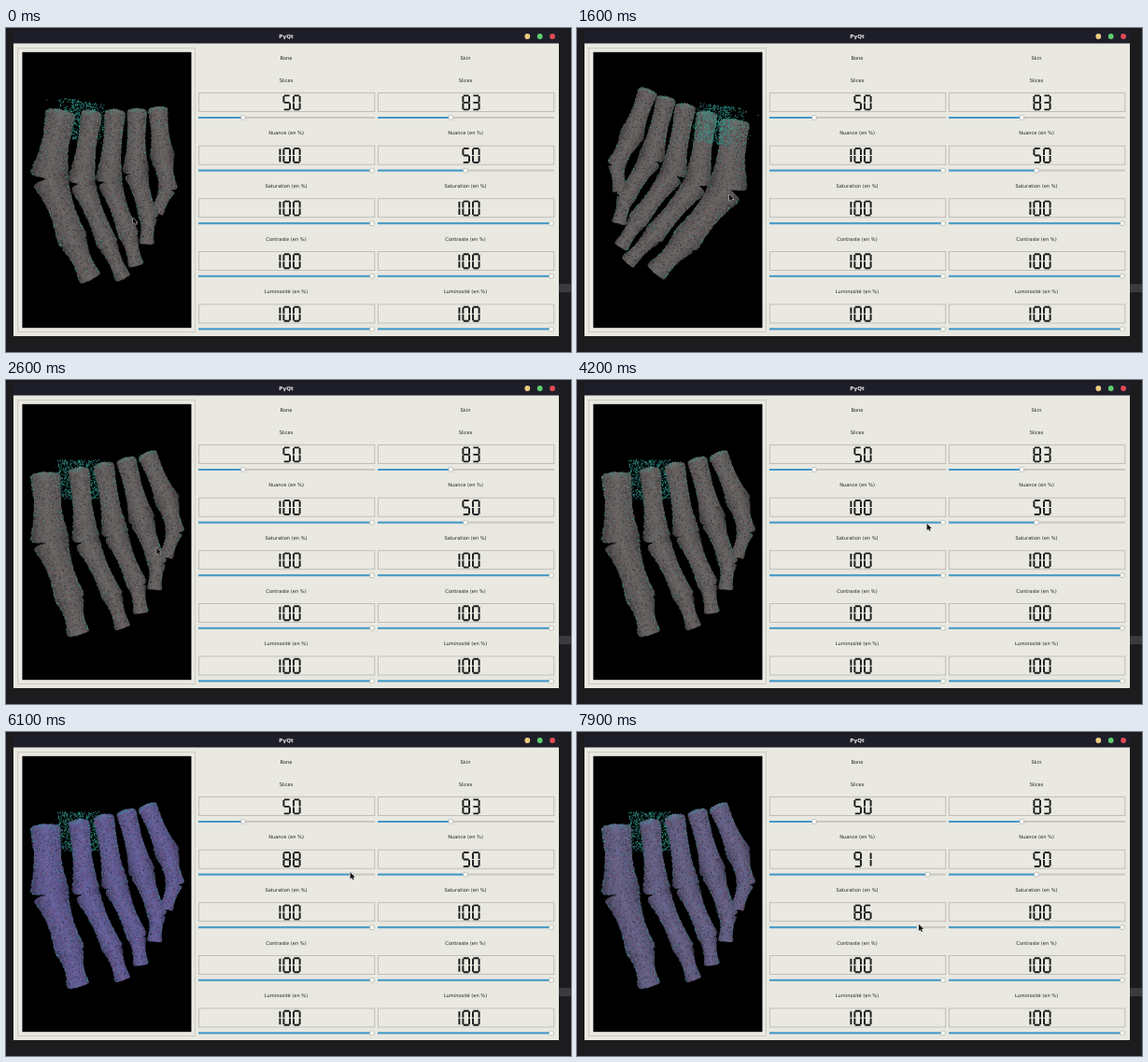
Write an HTML page with a canvas that moves like this. It is 605x347 px and loops after 8 s.

```html
<!DOCTYPE html>
<html>
<head>
<meta charset="utf-8">
<style>
html, body { margin: 0; width: 100%; height: 100%; overflow: hidden; background: #1c1c1e; }
canvas { display: block; }
</style>
</head>
<body>
<canvas id="stage" width="605" height="347"></canvas>
<script>
const ctx = document.getElementById('stage').getContext('2d');
const LOOP = 8000, STEP = 100;
const PIVOT = { x: 105, y: 170 };

// Joints of a ray from base to tip as [x, y, depth]; s runs from 0 (big toe) to 1 (little toe).
const joints = [
  s => [42 + 108 * s ** 0.8, 98 - 21 * s, 20 * s - 12],
  s => [47 + 126 * s ** 0.85, 171 + 12 * s - 53 * s * s, 20 * s - 20],
  s => [69 + 112 * s ** 0.65, 235 + 10 * s - 84 * s * s, 14 - 5 * s],
  s => [77 + 95 * s ** 0.5, 270 - 10 * s - 73 * s * s, 45 - 35 * s]];
const jointRadius = [17, 23, 17, 13];

// Yaw and roll in degrees, then the shift.
const poseKeys = [[100, [34, 10, 0, -2]], [800, [85, 8, 8, 0]], [1600, [220, 7, 0, -8]], [2600, [360, 0, 0, 0]]];
const cursorKeys = [
  [0, [136, 203]], [800, [148, 183]], [1600, [163, 178]], [2800, [161, 180]], [4300, [390, 152]],
  [4600, [390, 152]], [5300, [358, 149]], [5500, [358, 149]], [6400, [374, 151]], [7100, [389, 209]],
  [7200, [389, 209]], [7900, [366, 206]]];
const nuanceKeys = [[4600, [100]], [5300, [83]], [5500, [83]], [6400, [91]]];
const saturationKeys = [[7200, [100]], [7900, [86]]];

const lerp = (a, b, k) => a + (b - a) * k;
const mix = (a, b, k) => a.map((v, i) => lerp(v, b[i], k));
const rgb = (c, a = 1) => `rgba(${c.map(Math.round)},${a})`;

function sample(keys, t) {
  const next = keys.findIndex(([time]) => time > t);
  if (next < 0) return keys[keys.length - 1][1];
  if (next === 0) return keys[0][1];
  const [t0, a] = keys[next - 1], [t1, b] = keys[next];
  return mix(a, b, (t - t0) / (t1 - t0));
}

let seed;
function rand() {
  seed = (seed * 1664525 + 1013904223) % 4294967296;
  return seed / 4294967296;
}

function rect(x, y, w, h, color) {
  ctx.fillStyle = color;
  ctx.fillRect(x, y, w, h);
}

function disc(x, y, r, color) {
  ctx.fillStyle = color;
  ctx.beginPath();
  ctx.arc(x, y, r, 0, 7);
  ctx.fill();
}

function text(str, x, y, font, color) {
  ctx.font = font + ' "DejaVu Sans", sans-serif';
  ctx.fillStyle = color;
  ctx.fillText(str, x, y);
}

function projector([yaw, roll, shiftX, shiftY]) {
  const [cy, sy, cr, sr] = [yaw, roll].flatMap(a => [Math.cos(a * Math.PI / 180), Math.sin(a * Math.PI / 180)]);
  return ([x, y, z]) => {
    const dx = x - PIVOT.x, dy = y - PIVOT.y, across = dx * cy + z * sy;
    return {
      x: PIVOT.x + across * cr - dy * sr + shiftX,
      y: PIVOT.y + across * sr + dy * cr + shiftY,
      depth: z * cy - dx * sy
    };
  };
}

function bone(p, q, ra, rb, color, tint, cutEnd) {
  const length = Math.hypot(q.x - p.x, q.y - p.y) + 3;
  const width = u => lerp(ra, rb, u) * (1 - 0.27 * Math.sin(Math.PI * u))
    * (1 - Math.abs(2 * u - 1) ** 16) ** 0.35;
  ctx.save();
  ctx.translate(p.x, p.y);
  ctx.rotate(Math.atan2(q.y - p.y, q.x - p.x));
  ctx.beginPath();
  for (let i = 0; i <= 120; i++) {
    const u = 1 - Math.abs(1 - i / 60);
    ctx.lineTo(u * length + rand(), width(u) * (0.96 + 0.1 * rand()) * (i <= 60 ? 1 : -1));
  }
  const r = Math.max(ra, rb), shade = ctx.createLinearGradient(0, -r, 0, r);
  [0.5, 0.9, 1.05, 0.9, 0.5].forEach((k, i) => shade.addColorStop(i / 4, rgb(color.map(v => v * k))));
  ctx.fillStyle = shade;
  ctx.fill();
  const paints = ['rgba(20,20,24,.5)', rgb([175, 70, 85], 0.2 + 0.25 * tint),
    rgb(color.map(v => v * 1.35), 0.55), rgb([70, 110, 190], 0.08 + 0.4 * tint)];
  for (let i = length * (ra + rb) * 0.4; i > 0; i--) {
    const u = rand(), v = rand() * 2 - 1, pick = rand();
    const fringe = Math.abs(v) > 0.9 || (cutEnd && u < 0.06);
    const teal = pick < (fringe ? 0.45 : 0.02);
    rect(u * length, v * width(u), 0.9, 0.9, teal ? 'rgba(50,165,150,.8)' : paints[Math.floor(pick * 4)]);
  }
  ctx.restore();
}

function cloud(project) {
  for (let i = 0; i < 750; i++) {
    const near = rand() * rand();
    const p = project([55 + rand() * 45, 85 + rand() * 42, -12 - 55 * near]);
    rect(p.x, p.y, 1, 1, rgb([30 + rand() * 40, 110 + rand() * 80, 120 + rand() * 40], 0.85));
  }
}

function foot(t, nuance, saturation) {
  const project = projector(sample(poseKeys, t)), tint = (100 - nuance) / 17;
  let color = mix([100, 97, 95], [96, 90, 168], tint);
  const gray = (color[0] + color[1] + color[2]) / 3;
  color = color.map(v => lerp(gray, v, saturation / 100));
  const parts = [{ depth: project([78, 105, -32]).depth, paint: () => cloud(project) }];
  for (let ray = 0; ray < 5; ray++) {
    const s = ray / 4, scale = ray ? 0.72 - 0.08 * s : 1;
    const points = joints.map(at => project(at(s)));
    for (let i = 0; i < 3; i++) {
      const p = points[i], q = points[i + 1];
      const ra = jointRadius[i] * scale * (i ? 0.9 : 1), rb = jointRadius[i + 1] * scale;
      parts.push({ depth: (p.depth + q.depth) / 2, paint: () => bone(p, q, ra, rb, color, tint, !i) });
    }
  }
  parts.forEach((part, i) => part.seed = 7 + i * 9973);
  parts.sort((a, b) => a.depth - b.depth);
  ctx.save();
  ctx.beginPath();
  ctx.rect(18, 26, 180, 295);
  ctx.clip();
  for (const part of parts) {
    seed = part.seed;
    part.paint();
  }
  ctx.restore();
}

const digits = ['abcdef', 'bc', 'abdeg', 'abcdg', 'bcfg', 'acdfg', 'acdefg', 'abc', 'abcdefg', 'abcdfg'];

function lcd(value, right, top) {
  const w = 6.6, h = 7.5;
  ctx.strokeStyle = '#191919';
  ctx.lineWidth = 1.9;
  ctx.beginPath();
  [...String(value)].reverse().forEach((digit, place) => {
    const x = right - 7 - place * 10.6;
    for (const name of digits[digit]) {
      const row = 'agd'.indexOf(name), bar = 'febc'.indexOf(name);
      if (row >= 0) {
        ctx.moveTo(x + 0.4, top + row * h);
        ctx.lineTo(x + w - 0.4, top + row * h);
      } else {
        const bx = x + (bar >> 1) * w, by = top + (bar & 1) * h;
        ctx.moveTo(bx, by + 0.5);
        ctx.lineTo(bx, by + h - 0.5);
      }
    }
  });
  ctx.stroke();
}

function control(x, y, label, value, max) {
  text(label, x + 94, y + 0.4, '5.1px', '#222');
  ctx.strokeStyle = '#b7b5ae';
  ctx.lineWidth = 0.8;
  ctx.strokeRect(x + 0.4, y + 13.6, 188.4, 20);
  lcd(value, x + 109, y + 16.4);
  const handle = x + 2 + value / max * 184;
  rect(x, y + 39, 189, 2, '#c9c7c0');
  rect(x, y + 39, handle - x, 2, '#429bc9');
  ctx.fillStyle = '#fafaf8';
  ctx.strokeStyle = '#aaa9a3';
  ctx.lineWidth = 0.6;
  ctx.beginPath();
  ctx.roundRect(handle - 2.3, y + 37.7, 4.6, 4.6, 1);
  ctx.fill();
  ctx.stroke();
}

function cursor([x, y]) {
  ctx.save();
  ctx.translate(x, y);
  const arrow = new Path2D('M0 0V7L1.6 5.6L2.8 8L3.9 7.5L2.8 5.1H5Z');
  ctx.strokeStyle = '#ddd';
  ctx.lineWidth = 0.9;
  ctx.stroke(arrow);
  ctx.fillStyle = '#111';
  ctx.fill(arrow);
  ctx.restore();
}

function draw(t) {
  const nuance = Math.round(sample(nuanceKeys, t)[0]);
  const saturation = Math.round(sample(saturationKeys, t)[0]);
  ctx.textAlign = 'center';
  ctx.textBaseline = 'middle';
  rect(0, 0, 605, 347, '#1c1c1e');
  rect(592, 274, 13, 9, '#3a3b3f');
  ctx.fillStyle = '#1d1e29';
  ctx.beginPath();
  ctx.roundRect(8, 2, 584, 20, 3);
  ctx.fill();
  rect(8, 16.5, 584, 313.5, '#e9e8e1');
  text('PyQt', 300, 9.4, 'bold 5.6px', '#eee');
  ['#f0cb80', '#5fd06c', '#e24a51'].forEach((color, i) => disc(558.3 + i * 13.4, 9, 2.9, color));
  ctx.strokeStyle = '#c6c4bd';
  ctx.lineWidth = 0.8;
  ctx.strokeRect(12.5, 21.5, 190, 304);
  rect(16.5, 25, 182.8, 297, '#f6f5f1');
  rect(17.4, 25.8, 181.1, 295.4, '#000');
  foot(t, nuance, saturation);

  const labels = ['Slices', 'Nuance (en %)', 'Saturation (en %)', 'Contraste (en %)', 'Luminosité (en %)'];
  [['Bone', 50, nuance, saturation, 100, 100], ['Skin', 83, 50, 100, 100, 100]].forEach(([title, ...values], column) => {
    const x = 206 + column * 192;
    text(title, x + 94, 32.3, '5.1px', '#222');
    labels.forEach((label, i) => control(x, 56 + i * 56.6, label, values[i], i ? 100 : 200));
  });
  cursor(sample(cursorKeys, t));
}

let shown = -1;
function tick(now) {
  const t = Math.floor(now % LOOP / STEP) * STEP;
  if (t !== shown) draw(shown = t);
  requestAnimationFrame(tick);
}
draw(0);
requestAnimationFrame(tick);
</script>
</body>
</html>
```
